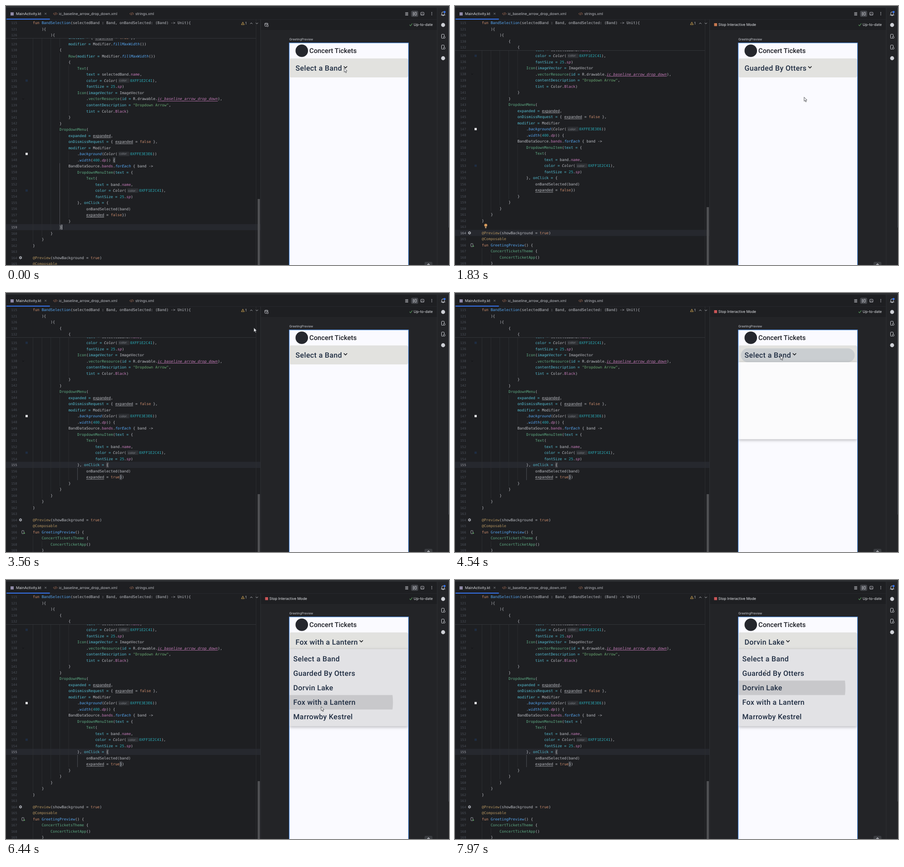
Animation, 977 px wide and 573 px high, one loop 8000 ms. Source, as an HTML page with a canvas:

```html
<!DOCTYPE html>
<html lang="en">
<head>
<meta charset="utf-8">
<title>Dropdown preview</title>
<style>
html, body { margin: 0; width: 100%; height: 100%; overflow: hidden; background: #1e1f22; }
canvas { display: block; }
</style>
</head>
<body>
<canvas id="stage" width="977" height="573"></canvas>
<script>
const ctx = document.getElementById('stage').getContext('2d');
const LOOP = 8000, W = 977, H = 573;
const LINE = 13.51, CHAR = 4.917, LEFT = 59, FIRST = 128;
const ROW = 32;
const MONO = '8.17px "DejaVu Sans Mono", monospace';
const UI = '8px Inter, sans-serif';
const TINY = '6.7px Inter, sans-serif';
const BAND = '500 16px Roboto, sans-serif';
const GREY = '#bcbec4', BRIGHT = '#ced0d6', INK = '#1e2c41';

const bands = ['Select a Band', 'Guarded By Otters', 'Dorvin Lake', 'Fox with a Lantern', 'Marrowby Kestrel'];

// "~x" in the code switches to a style: [colour, italic, underline]
const styles = {
  d: [GREY], k: ['#cf8e6d'], f: ['#56a8f5'], c: ['#5fad85'], n: ['#56c1d6'],
  p: ['#c77dbb'], q: ['#c77dbb', 1], u: ['#2aacb8'], s: ['#6aab73'], a: ['#b3935f'],
  i: ['#57aaf7', 1], g: [GREY, 1], U: [GREY, 0, 1], x: ['#c77dbb', 1, 1]
};
const body = `
                ~nonClick = ~d{ ~Uexpanded~d = ~ktrue~d },
                ~nmodifier = ~dModifier.~ifillMaxWidth~d())
            {
                ~cRow~d(~nmodifier = ~dModifier.~ifillMaxWidth~d())
                {
                    ~cText~d(
                        ~ntext = ~dselectedBand.~pname~d,
                        ~ncolor = ~gColor~d(~h~u0XFF1E2C41~d),
                        ~nfontSize = ~u25~d.~qsp~d)
                    ~cIcon~d(~nimageVector = ~dImageVector
                        .~cvectorResource~d(~nid = ~dR.drawable.~xic_baseline_arrow_drop_down~d),
                        ~ncontentDescription = ~s"Dropdown Arrow"~d,
                        ~ntint = ~dColor.~pBlack~d)
                }
            }
            ~cDropdownMenu~d(
                ~nexpanded = ~Uexpanded~d,
                ~nonDismissRequest = ~d{ ~Uexpanded~d = ~kfalse~d },
                ~nmodifier = ~dModifier
                    .~ibackground~d(~gColor~d(~h~u0XFFE3E3E6~d))
                    .~iwidth~d(~u400~d.~qdp~d)) {
                BandDataSource.~pbands~d.~iforEach~d { band ->
                    ~cDropdownMenuItem~d(~ntext = ~d{
                        ~cText~d(
                            ~ntext = ~dband.~pname~d,
                            ~ncolor = ~gColor~d(~h~u0XFF1E2C41~d),
                            ~nfontSize = ~u25~d.~qsp~d)
                    }, ~nonClick = ~d{
                        onBandSelected(band)
                        ~Uexpanded~d = ~kfalse~d})
                }
            }
        }
    }
}

~a@Preview~d(showBackground = ~ktrue~d)
~a@Composable
~kfun ~fGreetingPreview~d() {
    ~cConcertTicketsTheme ~d{
        ~cConcertTicketApp~d()
    }`.split('\n').slice(1);
const code = {
  115: '~kfun ~fBandSelection~d(selectedBand : Band, onBandSelected: (Band) -> Unit){',
  121: '    ){',
  126: '        ){'
};
body.forEach((s, i) => { code[FIRST + i] = s; });
const LAST = FIRST + body.length - 1;
const indentOf = n => code[n].search(/\S|$/);

// What the user does; rows count from the first menu item, the header is row -1
const RUN = 450;
const script = [
  [0, 'rest', -1], [RUN, 'run'], [900, 'open', -1], [1500, 'pick', 1], [1830, 'rest', 1],
  [2340, 'open', -1], [3010, 'rest', 1.75], [3290, 'edit'], [3800, 'run'],
  [4320, 'open', -1], [4540, 'rest', -1], [5500, 'pick', 1], [5760, 'rest', 1],
  [6300, 'pick', 3], [7085, 'pick', 4], [7810, 'pick', 2], [8500, 'rest', 0]
];

const clamp = v => Math.max(0, Math.min(1, v));
const ease = v => { v = clamp(v); return v * v * (3 - 2 * v); };
const easeOut = v => 1 - (1 - clamp(v)) ** 3;
const mix = (a, b, p) => a + (b - a) * p;

function stateAt(t) {
  const s = { running: false, edited: false, label: 0, openAt: Infinity, caret: 159 };
  for (const [at, action, row] of script) {
    if (t < at) break;
    if (action === 'run') {
      s.running = true;
      if (!s.edited) s.caret = 164;
    }
    if (action === 'open') s.openAt = at + 200;
    if (action === 'pick') {
      if (t > at + 25) s.label = row;
      if (t > at + 140 && !s.edited) s.openAt = Infinity;
    }
    if (action === 'edit') Object.assign(s, { running: false, edited: true, label: 0, openAt: Infinity, caret: 155 });
  }
  return s;
}

// The hand drifts left as it moves up and down the menu
const handX = t => t === 0 ? 747 : 660 + 110 * Math.exp(-Math.max(0, t - 1830) / 4200);

function place([at, action, row]) {
  if (action === 'run') return [575, 40];
  if (action === 'edit') return [300, 400];
  return [handX(at), 170 + ROW * row];
}

function cursorAt(t) {
  const i = script.findIndex(step => step[0] > t);
  const from = script[i - 1], to = script[i];
  const p = easeOut((t - from[0]) / (to[0] - from[0]));
  const a = place(from), b = place(to);
  return [mix(a[0], b[0], p), mix(a[1], b[1], p)];
}

function rect(x, y, w, h, color, r = 0) {
  ctx.fillStyle = color;
  ctx.beginPath();
  ctx.roundRect(x, y, w, h, r);
  ctx.fill();
}
function box(x, y, w, h, color, r = 1, lw = 0.9) {
  ctx.strokeStyle = color;
  ctx.lineWidth = lw;
  ctx.beginPath();
  ctx.roundRect(x, y, w, h, r);
  ctx.stroke();
}
function dot(x, y, r, color) {
  ctx.fillStyle = color;
  ctx.beginPath();
  ctx.arc(x, y, r, 0, 7);
  ctx.fill();
}
function line(color, lw, ...pts) {
  ctx.strokeStyle = color;
  ctx.lineWidth = lw;
  ctx.beginPath();
  for (let i = 0; i < pts.length; i += 2) ctx.lineTo(pts[i], pts[i + 1]);
  ctx.stroke();
}
function text(s, x, y, color, font, spacing = 0) {
  ctx.font = font;
  ctx.letterSpacing = spacing + 'px';
  ctx.fillStyle = color;
  ctx.fillText(s, x, y);
}
function clipped(x, y, w, h, r, draw) {
  ctx.save();
  ctx.beginPath();
  ctx.roundRect(x, y, w, h, r);
  ctx.clip();
  draw();
  ctx.restore();
}
function chevron(x, y, s, color, lw, dir = 1) {
  const d = dir * s / 2;
  line(color, lw, x - s, y - d, x, y + d, x + s, y - d);
}

function codeLine(n, y, caret, source = code[n]) {
  ctx.textAlign = 'right';
  text(n, 24.5, y + 2.7, n === caret ? '#a1a3ab' : '#4b5059', '7.2px "DejaVu Sans Mono", monospace');
  ctx.textAlign = 'left';
  let x = LEFT + indentOf(n) * CHAR;
  ('~d' + source.trim()).split('~').slice(1).forEach(part => {
    const key = part[0], str = part.slice(1);
    if (key === 'h') {
      rect(x + 1.8, y - 5, 25, 10, '#2d2f33', 2.5);
      text('color:', x + 4, y + 2.3, '#868a91', TINY);
      x += 28;
      return;
    }
    const [color, italic, under] = styles[key];
    text(str, x, y + 2.9, color, (italic ? 'italic ' : '') + MONO);
    const w = str.length * CHAR;
    if (under) rect(x, y + 4.3, w, 0.8, color);
    x += w;
  });
}

function gutterIcon(n, y) {
  const swatch = code[n].match(/0XFF(\w{6})/);
  if (swatch) rect(43, y - 2.5, 5, 5, '#' + swatch[1]);
  if (code[n].includes('vectorResource')) chevron(38, y, 1.8, '#0c0c0d', 1);
  if (code[n].includes('@Preview')) {
    for (let a = 0; a < 6; a++) dot(32 + 2.7 * Math.sin(a * Math.PI / 3), y - 2.7 * Math.cos(a * Math.PI / 3), 0.9, '#a9acb3');
    dot(32, y, 2.6, '#a9acb3');
    dot(32, y, 1.1, '#1e1f22');
  }
  if (code[n].includes('fun ')) {
    box(35, y - 3.5, 4.5, 7, '#a9acb3');
    dot(40.3, y + 2.3, 1.6, '#57965c');
  }
}

function editor(t, { edited, caret }) {
  const scroll = 54.9 * ease((t - RUN) / 130);
  const sticky = [115, 121, 126, 130, 132].slice(0, scroll > 27 ? 5 : 3);
  const top = 30.5 + sticky.length * LINE;
  const yOf = n => 489.3 + (n - 159) * LINE - scroll;
  const source = n => n === 157 && edited ? code[n].replace('false', 'true') : code[n];
  const brace = (n, ch) => {
    const col = source(n).replace(/~./g, '').lastIndexOf(ch);
    rect(LEFT + col * CHAR - 0.3, yOf(n) - 6, 5.5, 12, '#43454a');
  };
  const guide = (col, from, to, color) =>
    rect(LEFT + col * CHAR, yOf(from) - 6.8, 0.9, (to - from + 1) * LINE, color);

  clipped(0, top, 561, H - top, 0, () => {
    rect(0, yOf(caret) - 6.8, 561, LINE, '#26282e');
    for (let n = FIRST; n <= LAST; n++) {
      for (let col = 0; col <= 16 && col < indentOf(n); col += 4) guide(col, n, n, '#2d2f33');
    }
    const pair = edited ? [155, 157] : caret === 159 ? [148, 159] : null;
    if (pair) {
      guide(indentOf(pair[edited ? 0 : 1]), pair[0] + 1, pair[1] - !edited, '#55585e');
      brace(pair[0], '{');
      brace(pair[1], '}');
    }
    for (let n = FIRST; n <= LAST; n++) {
      codeLine(n, yOf(n), caret, source(n));
      gutterIcon(n, yOf(n));
    }
    if (caret === 159) rect(123, yOf(159) - 5.5, 1, 11, BRIGHT);
    if (caret === 164) {
      dot(67.8, yOf(163) - 3.4, 3.3, '#d69a5c');
      rect(66.2, yOf(163) + 0.4, 3.2, 2.6, '#c5a37e', 0.6);
    }
  });
  sticky.forEach((n, i) => codeLine(n, 37.3 + i * LINE, caret));
  rect(0, top, 551, 0.8, '#393b40');

  const thumb = 427 + scroll / 3.05;
  rect(551, 30, 1, H, '#2b2d30');
  rect(555, thumb, 5, H - thumb, '#4f5053');
  line('#c29a4e', 1, 519, 41.3, 522.3, 35.5, 525.6, 41.3, 519, 41.3);
  rect(521.9, 37.7, 0.8, 2, '#c29a4e');
  text('1', 527.5, 41, GREY, UI);
  chevron(541, 38.4, 2.4, GREY, 1, -1);
  chevron(553.3, 38.4, 2.4, GREY, 1);
}

function fileTab(x, name) {
  const y = 17.2, color = '#b5765b';
  line(color, 0.9, x + 2.4, y - 2.4, x, y, x + 2.4, y + 2.4);
  line(color, 0.9, x + 6.2, y - 2.4, x + 8.6, y, x + 6.2, y + 2.4);
  line(color, 0.9, x + 5.1, y - 3, x + 3.5, y + 3);
  text(name, x + 12.2, 20, GREY, UI);
}

function chrome() {
  rect(0, 0, W, H, '#1e1f22');
  rect(0, 0, W, 4, '#2b2d30');
  rect(562, 53, 389, H, '#232427');
  rect(951, 4, 26, H, '#232427');
  rect(950.5, 4, 1, H, '#2e3034');
  rect(976, 4, 1, 486, '#4a4f57');
  rect(0, 29.5, 951, 0.8, '#2b2d30');
  rect(561, 30, 1, H, '#2e3034');
  rect(1, 28, 96, 2, '#3574f0', 1);

  rect(10, 14, 7, 7, '#8f8aa8');
  text('MainActivity.kt', 22, 20, '#dfe1e5', UI);
  [-2, 2].forEach(d => line('#8c8f95', 0.8, 87.3 - d, 15, 87.3 + d, 19));
  fileTab(104.5, 'ic_baseline_arrow_drop_down.xml');
  fileTab(273, 'strings.xml');

  rect(893.5, 10.5, 15.5, 13.5, '#43454a', 3);
  for (let i = 0; i < 4; i++) {
    rect(880.5, 14 + i * 2, 6.5, 0.9, BRIGHT);
    rect(897.2, 14 + i * 2, 3, 0.9, BRIGHT);
  }
  box(901.7, 14, 3.5, 6.5, BRIGHT);
  box(914.8, 14, 7, 6.3, BRIGHT);
  chevron(918.3, 18.3, 3, BRIGHT, 0.8, -1);
  for (let i = 0; i < 3; i++) dot(939, 14.4 + i * 2.7, 0.8, BRIGHT);

  box(961, 13, 6, 7, BRIGHT, [3, 3, 0, 0], 1);
  rect(959.3, 19.5, 9.4, 1, BRIGHT);
  rect(962.8, 21, 2.5, 1, BRIGHT);
  dot(967.2, 13.2, 2.3, '#3574f0');
  [42, 115.5].forEach(y => dot(964, y, 4.4, BRIGHT));
  [67, 91].forEach(y => {
    box(960.5, y - 4.5, 6, 9, BRIGHT, 1, 1);
    rect(963.5, y, 5.5, 4.5, '#232427');
    box(964.5, y + 0.7, 3.8, 3.5, BRIGHT);
  });

  line('#57965c', 1.1, 890, 41.5, 892.2, 43.8, 896.2, 38.6);
  text('Up-to-date', 899, 44, '#dfe1e5', UI);
  rect(923, 566, 17.5, 10, '#3a3c40', 3);
  chevron(931.8, 571.8, 2.8, BRIGHT, 1.3, -1);
}

function toolbar({ running, edited }) {
  if (running) {
    rect(571.5, 38, 6.5, 6.5, edited ? '#cb5557' : '#c8784f', 0.6);
    text('Stop Interactive Mode', 580.8, 43.8, '#dfe1e5', UI);
  } else {
    box(570.8, 38, 6.8, 6.8, BRIGHT);
    rect(570.8, 39.6, 6.8, 0.9, BRIGHT);
    rect(574, 41.2, 5, 5, '#1e1f22');
    box(574.8, 42, 3.6, 3.6, BRIGHT);
  }
}

// Ink spreads from the tap point to the middle of a bounded shape, then fades
function ripples(t, action, shapeOf, color) {
  script.filter(step => step[1] === action).forEach(([at, , row]) => {
    const age = t - at;
    if (age < 0 || age > 360) return;
    const [left, top, w, h, r] = shapeOf(row);
    const p = clamp(age / 225);
    ctx.globalAlpha = clamp(age / 75) * (1 - clamp((age - 210) / 150));
    clipped(left, top, w, h, r, () => dot(mix(handX(at), left + w / 2, p), top + h / 2, 79 + 64 * p, color));
    ctx.globalAlpha = 1;
  });
}

function menu(t, openAt) {
  const blank = t - openAt < 80;
  ctx.shadowColor = 'rgba(0,0,0,.28)';
  ctx.shadowBlur = 7;
  ctx.shadowOffsetY = 2;
  rect(625, 153, 262, 170.5, blank ? '#fbfbfc' : '#e2e2e5', 2);
  ctx.shadowColor = 'transparent';
  if (blank) return;
  ripples(t, 'pick', row => [625, 158.5 + row * ROW, 262, ROW, 0], 'rgba(0,0,0,.115)');
  bands.forEach((band, i) => text(band, 633.5, 180.2 + i * ROW, INK, BAND, 0.36));
}

function phone(t, { label, openAt }) {
  text('GreetingPreview', 625, 75.6, BRIGHT, TINY);
  rect(624, 81, 264.3, H, '#4a86d8');
  clipped(625.3, 82.3, 261.7, H, 0, () => {
    rect(625, 82, 263, H, '#fafaff');
    dot(652.3, 99, 13.8, '#25272d');
    text('Concert Tickets', 669, 104.3, '#1b1d24', '500 14.8px Roboto, sans-serif');

    rect(625, 116, 262, 42, '#e2e2df', 4);
    ripples(t, 'open', () => [630.5, 122.5, 251, 30.5, 15.2], 'rgba(30,60,110,.13)');
    text(bands[label], 638.5, 142.8, INK, BAND, 0.36);
    chevron(646 + ctx.measureText(bands[label]).width, 135.3, 3.7, '#14161a', 1.6);
    if (t >= openAt) menu(t, openAt);
  });
}

const arrow = new Path2D('M0 0V9L2.1 7.2L3.6 10.6L5 10L3.5 6.7L6.4 6.5Z');
function pointer(t) {
  ctx.save();
  ctx.translate(...cursorAt(t));
  ctx.fillStyle = '#f4f4f6';
  ctx.fill(arrow);
  ctx.strokeStyle = '#33353a';
  ctx.lineWidth = 0.8;
  ctx.stroke(arrow);
  ctx.restore();
}

function frame() {
  const t = performance.now() % LOOP;
  const state = stateAt(t);
  ctx.textRendering = 'geometricPrecision';
  chrome();
  editor(t, state);
  toolbar(state);
  phone(t, state);
  pointer(t);
  requestAnimationFrame(frame);
}
frame();
</script>
</body>
</html>
```
